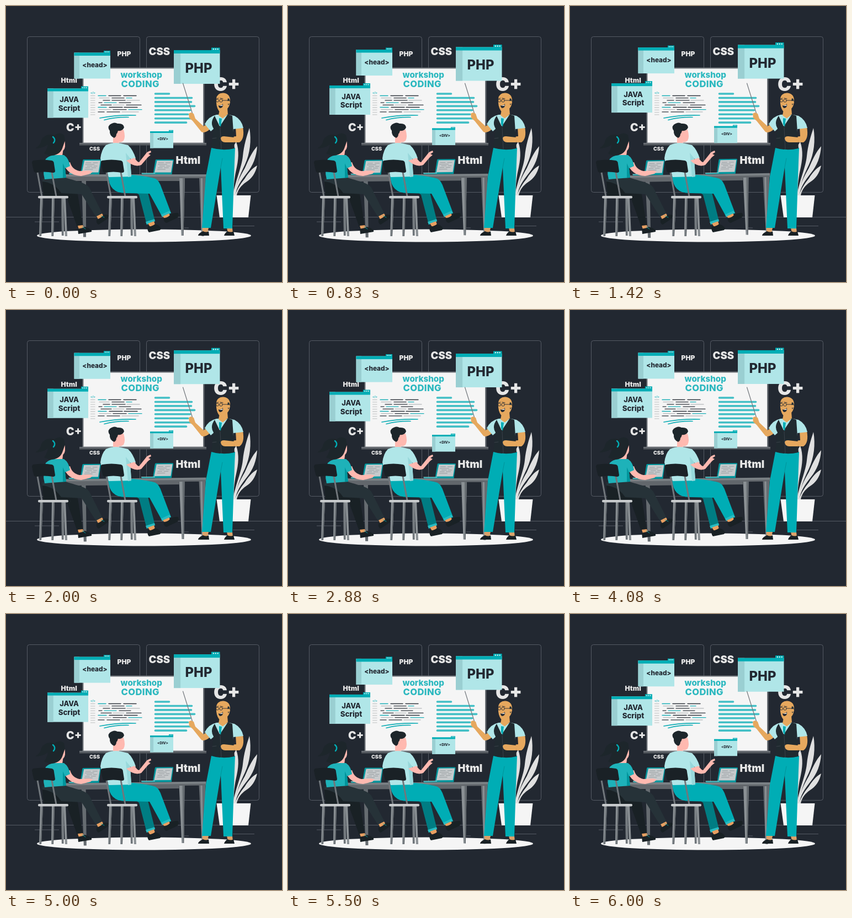
Write an HTML page that moves like this. It is 500 by 500 pixels and loops after 6040 ms.

```html
<!DOCTYPE html>
<html lang="en">
<head>
<meta charset="utf-8">
<title>Coding workshop</title>
<style>
  html, body { margin: 0; width: 100%; height: 100%; overflow: hidden; background: #222831; }
  svg { display: block; width: 100vw; height: 100vh; }
  text { font-family: Inter, "Open Sans", sans-serif; font-weight: 800; }
  .label { fill: #e6e6e6; }
  .label text { font-weight: 900; }
  .line { fill: none; stroke-linecap: round; stroke-linejoin: round; }
</style>
</head>
<body>
<svg viewBox="0 0 500 500">
  <rect width="500" height="500" fill="#222831"/>
  <g fill="none" stroke="#626871" stroke-width=".8">
    <rect x="38.5" y="55.5" width="204" height="282" rx="4"/>
    <rect x="254.5" y="55.5" width="204" height="282" rx="4"/>
    <path d="M0 382.5H500M52 391H96M323 402H331M411 398.5H450"/>
  </g>
  <ellipse cx="250" cy="416" rx="194" ry="11.5" fill="#f5f5f5"/>

  <g id="plant">
    <g fill="#e0e0e0">
      <path d="M411 343C417 312 427 292 429 272C431 252 436 236 441 221C445 243 442 268 433 287C424 306 416 324 415 343Z"/>
      <path d="M410 343C413 318 407 300 407 282C407 266 411 254 417 246C423 262 421 280 417 297C413 315 412 330 413 343Z"/>
      <path d="M413 343C418 318 426 306 433 293C440 277 446 264 455 254C454 273 447 290 437 302C426 316 417 328 416 343Z"/>
      <path d="M415 343C420 328 427 320 433 312C439 302 446 294 455 289C452 303 445 313 435 319C426 325 420 333 418 343Z"/>
    </g>
    <path fill="#f5f5f5" d="M381.500 343H443.500L439 383H387Z"/>
  </g>

  <g class="label" id="labels"></g>

  <g id="board">
    <rect x="139.500" y="112.500" width="219" height="136" fill="#f5f5f5" stroke="#72777c" stroke-width="2"/>
    <path stroke="#50565d" stroke-width="2" d="M358.500 112V249"/>
    <rect x="133" y="248" width="230" height="4.5" fill="#555a60"/>
    <rect x="133" y="248" width="230" height="1.3" fill="#777c81"/>
    <g fill="#2bb8bf">
      <text x="207.5" y="130" font-size="15.2">workshop</text>
      <text x="208.5" y="147" font-size="16.6" letter-spacing=".4">CODING</text>
      <text x="153" y="158.5" font-size="5">&lt;/&gt;</text>
    </g>
    <g id="code" class="line"></g>
    <path class="line" stroke="#11aeb6" stroke-width="1.7" d="M170 203Q200 197 235 198M178 206.5Q199 201 222 201.5"/>
  </g>

  <g id="windows"></g>

  <g id="table">
    <path fill="#666c71" d="M137 311H145V418.500H140ZM350 311H362L358.500 417H354Z"/>
    <path fill="#8a9094" d="M314 311H324L321.500 416H317.500ZM353 311H356V417H354Z"/>
    <path fill="#666c71" d="M320 311H324L321.500 416H320Z"/>
    <path fill="#7b8185" d="M99 305H363V311H99Z"/>
    <path fill="#62676c" d="M99 309H363V312H314V317H99Z"/>
    <g id="laptops"></g>
  </g>

  <g id="woman">
    <path fill="#192125" d="M66 318L110 316Q126 326 130 341L139 398L129 400L110 347L70 348Q66 340 66 318Z"/>
    <path fill="#263238" d="M66 312L108 311C133 319 144 320 151 329L176 379L165 385L137 341L100 339Q88 320 66 318Z"/>
    <path fill="#e89f61" d="M164 381L174 376L177 381L168 388ZM130 398L139 397L141 402L132 405Z"/>
    <path fill="#192125" d="M164 387Q173 384 177 378Q184 377 186 380Q186 384 180 388L168 396Q163 395 164 387ZM130 403Q137 404 143 400Q152 403 155 406V409L131 413Z"/>
    <path class="line" stroke="#00adb5" stroke-width=".8" d="M172 380L178 383M138 400L144 404"/>
    <path fill="#ffb9b0" d="M104 285L116 283C119 293 125 297 133 299L151 298L157 300L153 304L136 308C119 307 109 299 104 285Z"/>
    <path fill="#ffb9b0" d="M89 261L104 256L102 272L88 273Z"/>
    <path fill="#1eb2b9" d="M72 277Q80 269 93 270L105 270Q114 276 116 290L107 294L109 311L70 314Q65 295 72 277Z"/>
    <path fill="#00959c" d="M103 285L107 294L109 311H103Z"/>
    <path fill="#ffb9b0" d="M96 238Q107 239 107 250Q108 261 100 264L91 262Z"/>
    <path fill="#1d262b" d="M88 234Q98 227 105 234L107 243Q105 250 102 258Q97 271 79 271L69 267Q74 261 76 251Q66 258 53 258Q63 252 64 243Q71 230 88 234Z"/>
    <path class="line" stroke="#00adb5" stroke-width="2.500" d="M85 237Q91 242 86 248"/>
  </g>

  <g id="man">
    <path fill="#007d83" d="M224 329L256 334L270 390L255 396L241 342Z"/>
    <path fill="#00adb5" d="M185 308L231 306Q260 309 271 313Q278 317 282 330L299 375L283 382L260 340L218 339Q187 340 185 308Z"/>
    <path fill="#29bbc2" d="M283 382L281 378L296 371L299 375ZM255 396L253 391L269 386L270 390Z"/>
    <path fill="#e89f61" d="M257 394L268 390L270 396L261 400ZM284 381L295 376L298 380L288 386Z"/>
    <path fill="#192125" d="M286 384Q294 384 298 377Q307 374 312 375Q315 380 310 384L291 393Q285 392 286 384ZM257 399Q265 400 270 395Q278 397 281 403L279 406L259 410Q255 406 257 399Z"/>
    <path fill="#ffb9b0" d="M194 226L213 224Q217 237 213 244Q208 248 204 246L207 253L194 252Z"/>
    <path fill="#b0e6e8" d="M181 252Q194 246 208 249L221 252Q230 260 235 276L229 282L225 276L227 309L186 310L179 286Q172 284 171 276Q173 260 181 252Z"/>
    <path fill="#98d8db" d="M217 266L225 276L227 309L221 310Z"/>
    <path fill="#ffb9b0" d="M218 280L233 275Q237 282 241 283L253 268Q255 264 262 262L263 265L258 268L262 270L257 274L245 288Q232 293 218 280Z"/>
    <path fill="#1d262b" d="M188 215Q196 209 202 213Q213 212 214 220Q211 227 203 226Q202 230 200 232Q200 237 196 239Q187 235 188 226Q183 220 188 215Z"/>
  </g>

  <g id="chairs"></g>

  <g id="teacher">
    <path class="line" stroke="#72777c" stroke-width="1.200" d="M339 199L320.500 140"/>
    <path fill="#dba26b" d="M356 402H367L365 411H356ZM400 402H410L411 411H402Z"/>
    <path fill="#192125" d="M357 408Q363 411 367 408L368 416H348Q348 412 357 408ZM401 408Q408 411 412 408L414 416H395Q396 412 401 408Z"/>
    <path fill="#00adb5" d="M372 257H415L413 310L410 403H394L389 292L371 402H355L362 309Z"/>
    <path class="line" stroke="#008d94" stroke-width=".8" d="M389 292L392 276"/>
    <path fill="#e6a85e" d="M368 211L358 218L343 204L340 195L335 193L331 195L332 203L338 208L354 228Q363 232 374 218ZM416 219L429 219Q433 240 423 247L400 247Q391 247 389 241L391 236L408 237L417 236Z"/>
    <path fill="#b0e6e8" d="M381 197Q367 200 360 214L371 227L378 221L386 255H410L412 223L430 221Q427 206 414 199L399 196Z"/>
    <path fill="#e6a85e" d="M387 188L401 184L402 197L392 204L385 198Z"/>
    <path fill="#202a30" d="M378 199L387 218L401 196L410 199L414 258Q393 263 372 257L376 222Q369 211 378 199Z"/>
    <path fill="#b0e6e8" d="M383 197L388 217L402 196L393 204Z"/>
    <path fill="#00adb5" d="M386 203L391 204L389 219L386 214Z"/>
    <path class="line" stroke="#444b53" stroke-width=".7" d="M388 220L390 259M374 240L381 239"/>
    <path fill="#e6a85e" d="M389 240Q389 236 395 236L413 238V247H397Q390 247 389 240Z"/>
    <path fill="#e6a85e" d="M381 168Q382 158 393 157.500Q405 158 406 170Q406 181 401 186L395 192Q389 195 385 189Q380 181 381 168Z"/>
    <path fill="#263238" d="M402 167Q406 168 405.500 174L403 180Q400 174 402 167Z"/>
    <circle cx="403" cy="174.500" r="2.800" fill="#e6a85e"/>
    <path class="line" stroke="#222831" stroke-width=".9" d="M381 168L385 167M388 167L393 168M392 171L402 171"/>
    <g fill="none" stroke="#222831" stroke-width=".9">
      <circle cx="383" cy="171.500" r="2.500"/><circle cx="389.500" cy="171.500" r="2.700"/>
    </g>
    <path fill="#222831" d="M385 180Q390 181 393 177Q394 184 388 185Q385 184 385 180Z"/>
    <path fill="#fff" d="M386 180.500Q390 181 392.500 178.500L392 181H387Z"/>
  </g>
</svg>
<script>
const LOOP = 6040;
const HALF_SWING = LOOP / 4;
const byId = id => document.getElementById(id);
const fillIn = (id, items, draw) => { byId(id).innerHTML = items.map(item => draw(...item)).join(''); };
const rect = (x, y, w, h, fill) =>
  `<rect x="${x}" y="${y}" width="${w}" height="${h}" fill="${fill}"/>`;
const stroke = (d, color, width) =>
  `<path d="${d}" stroke="${color}" stroke-width="${width}"/>`;

fillIn('labels', [
  ['PHP', 201.5, 90.5, 12.1], ['CSS', 258.5, 88.5, 18.6], ['Html', 99.5, 139, 12.2],
  ['C+', 109, 227, 19.6], ['CSS', 151, 262, 9.2], ['Html', 307.5, 286, 18.6],
  ['C+', 376, 153.5, 33.5]
], (text, x, y, size) => `<text x="${x}" y="${y}" font-size="${size}">${text}</text>`);

// Each code row lists the edges of its dashes.
const codeRows = [
  [167, 181, 186, 208, 213, 236], [169, 187, 192, 214, 218, 228],
  [176, 188, 192, 216, 219, 242], [168, 174, 178, 200, 205, 226],
  [172, 191, 194, 214, 218, 245], [167, 182, 187, 211, 214, 238],
  [169, 190, 194, 218, 222, 246], [167, 178, 183, 206, 210, 240]
];
const dashColors = ['#19aeb6', '#30363e', '#30363e', '#b4b8ba', '#30363e'];
const drawCode = () => {
  let out = '';
  codeRows.forEach((row, i) => {
    const y = 162.5 + i * 4.2;
    for (let j = 0; j < row.length; j += 2) {
      out += stroke(`M${row[j]} ${y}H${row[j + 1]}`, dashColors[(i * 3 + j / 2) % 5], 1.3);
    }
  });
  for (let i = 0; i < 9; i++) out += stroke(`M153.5 ${162.5 + i * 4.3}H161`, '#c9cbcc', 1.3);
  [297, 338, 337, 343, 335, 331, 337, 328].forEach((end, i) => {
    out += stroke(`M270.5 ${159 + i * 7.45}H${end - 1.5}`, '#42bfc5', 3.6);
  });
  return out;
};
byId('code').innerHTML = drawCode();

// x, top of the title bar, width, height, title bar height, tab width, tab height, text lines
fillIn('windows', [
  [123.5, 84.5, 65.5, 47, 5.5, 12, 3.5, [['&lt;head&gt;', 161, 111.3, 11.8]]],
  [304, 80, 83.5, 61, 6, 15.5, 4.5, [['PHP', 349, 121, 23.8]]],
  [75, 149.5, 74, 53, 5, 13, 4, [['JAVA', 114.5, 174.2, 12.8], ['Script', 114.5, 189.7, 13.3]]],
  [261, 227, 42, 30.5, 3, 8, 2.2, [['&lt;DIV&gt;', 284, 243, 6.3]]]
], (x, y, w, h, bar, tabW, tabH, lines) => {
  const tabX = x + w - tabW;
  const dots = [1, 2, 3].map(i =>
    `<circle cx="${tabX + tabW * i / 4}" cy="${y - tabH * .4}" r="${tabW * .075}" fill="#f5f5f5"/>`).join('');
  const words = lines.map(([text, cx, base, size]) =>
    `<text x="${cx}" y="${base}" font-size="${size}" text-anchor="middle" fill="#222831">${text}</text>`).join('');
  return rect(x, y, w, h, '#b0e6e8') + rect(x, y, w * .145, h, '#9acfd2') +
    rect(x, y, w, bar, '#00adb5') + rect(tabX, y - tabH, tabW, tabH + .3, '#00adb5') + dots + words;
});

fillIn('laptops', [[135], [266.5]], x => `<g transform="translate(${x} 278)">
  <path fill="#00979e" d="M6 0H36Q38 0 37.500 2L34 26H0L4 2Q4 0 6 0Z"/>
  <path fill="#c6cacc" d="M7 2H36L32.500 23.500H2.500Z"/>
  <path class="line" stroke="#8a9094" stroke-width=".8" d="M10 6H19M23 6H31M9 9H25M12 12H21M24 12H30M9 15H17M20 15H28M8 18H22"/>
  <path fill="#00979e" d="M-21 25H34V27H-20Z"/>
  <path fill="#b0e6e8" d="M-21 24.500H4V25.500H-21Z"/></g>`);

fillIn('chairs', [[0], [125]], x => `<g transform="translate(${x} 0)">
  <path class="line" stroke="#71777c" stroke-width="3" d="M57 301L65 345M83 301L91 345"/>
  <path fill="#1a2126" d="M49 280Q66 277 83 280Q87 281 87 286L89 299Q89 302 85 302Q69 299 55 302Q51 302 50 298L47 284Q47 281 49 280Z"/>
  <path fill="#8a9094" d="M62 348H67L64 417H60ZM83 348H88L86 417H82ZM100 348H104L105 416H101ZM104 348H108L111 417H107Z"/>
  <path fill="#666c71" d="M65 348H67L64 417H62ZM86 348H88L86 417H84ZM100 348H102L103 416H101Z"/>
  <rect x="58" y="344" width="55" height="4.5" rx="2" fill="#c8cbcd"/></g>`);

// Windows and table swing at constant speed between two poses.
const render = now => {
  const phase = now / HALF_SWING % 2;
  const lift = phase < 1 ? phase : 2 - phase;
  byId('windows').setAttribute('transform', `translate(0 ${-10 * lift})`);
  byId('table').setAttribute('transform', `rotate(${-lift} 231 348)`);
};

const start = performance.now();
const tick = () => {
  render(performance.now() - start);
  requestAnimationFrame(tick);
};
tick();
</script>
</body>
</html>
```
